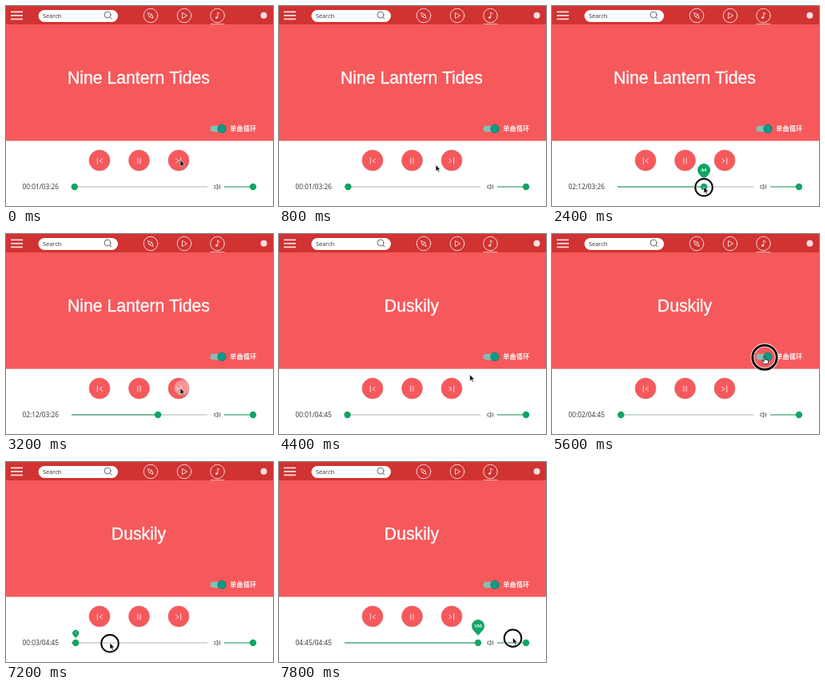
Animation, 334 px wide and 250 px high, one loop 8 s. Source, as an HTML page:

```html
<!DOCTYPE html>
<html lang="zh">
<head>
<meta charset="utf-8">
<title>Music player</title>
<style>
  html, body { margin: 0; width: 100%; height: 100%; overflow: hidden; background: #fff; }
  svg { display: block; width: 100vw; height: 100vh; }
  .line { fill: none; stroke: #fff; stroke-linecap: round; stroke-linejoin: round; }
  .dark { stroke: #555; }
  #title { font: 21.2px "Liberation Sans", Arial, sans-serif; fill: #fff; stroke: #fff; stroke-width: .3; text-anchor: middle; }
  .small { font-family: "Open Sans", sans-serif; fill: #333; }
  #mode { font: bold 8px "Noto Sans CJK SC", "Noto Sans CJK", sans-serif; letter-spacing: .3px; fill: #fff; opacity: .93; }
  #percent { font: bold 5.8px Roboto, sans-serif; fill: #fff; text-anchor: middle; }
</style>
</head>
<body>
<svg viewBox="0 0 334 250" preserveAspectRatio="none">
  <rect width="334" height="168.6" fill="#f6595c"/>
  <rect width="334" height="23" fill="#d13232"/>

  <path d="M6 7.3H21M6 11.8H21M6 16.3H21" fill="none" stroke="#f8dede" stroke-width="1.7"/>
  <rect x="40.5" y="5" width="99.5" height="15" rx="7.5" fill="#fff"/>
  <text x="46" y="15" class="small" font-size="7.4">Search</text>
  <g class="line dark" stroke-width=".9">
    <circle cx="127" cy="11" r="3.9"/><path d="M129.9 13.9L132 16"/>
  </g>

  <g opacity=".86">
    <g class="line" stroke-width=".9">
      <circle cx="181" cy="12" r="8.8"/>
      <circle cx="223" cy="12" r="8.8"/>
      <circle cx="264.5" cy="12" r="8.8"/>
      <path d="M177.8 8.6L182.6 10.5L184.2 15.4L179.4 13.5ZM182.6 10.5L179.4 13.5"/>
      <path d="M220.8 8.6L226.6 12L220.8 15.4Z"/>
      <path d="M264.8 14.3V7.8Q265.4 9.3 267.2 9.7"/>
    </g>
    <ellipse cx="263.5" cy="14.5" rx="1.5" ry="1.3" fill="#fff"/>
    <path d="M255.5 22.5H273.5" stroke="#fff" stroke-width=".7"/>
  </g>
  <circle cx="322.5" cy="11.7" r="4" fill="#f6dede"/>

  <text id="title" x="166" y="97"></text>

  <rect id="track" x="255.5" y="149.8" width="18.5" height="7.4" rx="3.7"/>
  <circle cx="270" cy="154" r="0"/>
  <circle id="knob" cy="153.4" r="5.4" stroke="#000" stroke-opacity=".2" stroke-width=".8"/>
  <text id="mode" x="280.3" y="156.2">单曲循环</text>

  <g fill="#f6595c" stroke="#d9686a" stroke-width=".6">
    <circle cx="117" cy="193" r="13"/>
    <circle cx="166.5" cy="193" r="13"/>
    <circle cx="216" cy="193" r="13"/>
  </g>
  <g class="line" stroke-width=".9" opacity=".92">
    <path d="M114.3 190V197.3M120.3 191.3L117 193.6L120.3 195.9"/>
    <path d="M164.9 190.2V196.8M168.1 190.2V196.8"/>
    <path d="M212.7 191.3L216 193.6L212.7 195.9M218.7 190V197.3"/>
  </g>
  <clipPath id="nextShape"><circle cx="216" cy="193" r="13"/></clipPath>
  <g clip-path="url(#nextShape)"><circle id="ripple" cx="220" cy="192" fill="#fff"/></g>

  <text id="time" x="20.5" y="228.5" class="small" font-size="8.3"></text>
  <path d="M82 226H252" stroke="#c6cfca" stroke-width="1.3"/>
  <path id="played" stroke="#5fb18b" stroke-width="1.3"/>
  <circle id="thumb" cy="226" r="4.2" fill="#0fa566"/>
  <g id="bubble">
    <path d="M0 -6L-6.3 -13A8 8 0 1 1 6.3 -13Z" fill="#0fa566"/>
    <text id="percent" y="-16"></text>
  </g>

  <path d="M261.2 224.5H262.6L264.6 223V229L262.6 227.5H261.2Z" class="line dark" stroke-width=".8"/>
  <path d="M266.2 224.6Q267.3 226 266.2 227.4M267.4 223.3Q269.6 226 267.4 228.7" class="line dark" stroke-width=".7"/>
  <path d="M273 226H309" stroke="#5fb18b" stroke-width="1.3"/>
  <circle cx="309" cy="226" r="4.2" fill="#0fa566"/>

  <g id="ring" fill="none">
    <circle r="11" stroke="#fff" stroke-opacity=".7" stroke-width="3.6"/>
    <circle r="11" stroke="#000" stroke-width="2"/>
  </g>
  <path id="arrow" d="M0 0V8L1.9 6.4L3.2 9.3L4.5 8.7L3.2 5.9H5.6Z" stroke="#fff" stroke-width=".6"/>
  <path id="hand" d="M-.8 0Q0 -1.2 .8 0V3.4L4 4.2Q5 4.6 4.7 6L4 9H-.8L-3.5 5.8Q-3.3 4.5 -2 5.2L-.8 6Z" fill="#fff" stroke="#111" stroke-width=".8"/>
</svg>
<script>
const LOOP = 8000, STEP = 200;

// Each song plays in real time from `start`; a drag moves it to `seekTo` seconds.
const songs = [
  { title: "Nine Lantern Tides", length: 206, start: -1000, grab: 1800, settle: 2400, release: 2400, seekTo: 132 },
  { title: "Duskily", length: 285, start: 3400, grab: 7200, settle: 7600, release: LOOP, seekTo: 285 }
];

const nextButton = { x: 218, y: 192.5 };
const toggle = { x: 266, y: 153.5 };
const moves = [
  { from: 400, until: 1800, to: { x: 108, y: 223 } },
  { from: 1800, until: 2400, to: { x: 190, y: 226 } },
  { from: 2400, until: 3100, to: nextButton },
  { from: 3900, until: 5000, to: toggle },
  { from: 5700, until: 7000, to: { x: 130, y: 226 } },
  { from: 7200, until: 7800, to: { x: 292.5, y: 219.5 } }
];

const $ = id => document.getElementById(id);
const set = (id, attrs) => {
  for (const name in attrs) $(id).setAttribute(name, attrs[name]);
};
const show = (id, visible) => set(id, { visibility: visible ? "visible" : "hidden" });
const within = (t, from, to) => t >= from && t <= to;
const ramp = (t, from, to) => Math.min(1, Math.max(0, (t - from) / (to - from)));
const smooth = u => u * u * (3 - 2 * u);
const mix = (a, b, u) => a + (b - a) * u;

function clock(seconds) {
  const pad = n => String(Math.floor(n)).padStart(2, "0");
  return pad(seconds / 60) + ":" + pad(seconds % 60);
}

function drawPlayer(t, song) {
  const seconds = mix((t - song.start) / 1000, song.seekTo, ramp(t, song.grab, song.settle));
  const progress = seconds / song.length;
  const x = mix(85, 249, progress);
  const size = ramp(t, song.grab - 200, song.grab + 200) - ramp(t, song.release, song.release + 300);

  $("title").textContent = song.title;
  $("time").textContent = clock(seconds) + "/" + clock(song.length);
  $("percent").textContent = Math.round(progress * 100);
  set("played", { d: `M82 226H${x}` });
  set("thumb", { cx: x });
  set("bubble", { transform: `translate(${x} 223) scale(${size})` });
  show("bubble", size > 0);
}

function drawSwitch(t) {
  const on = 1 - ramp(t, 5000, 5150) + ramp(t, 5400, 5600);
  set("knob", { cx: mix(260, 270, on), fill: on > 0.5 ? "#0b9a88" : "#fafafa" });
  set("track", { fill: on > 0.5 ? "#83bfb2" : "#a8484a" });
}

function drawPointer(t, song) {
  let { x, y } = nextButton;
  for (const { from, until, to } of moves) {
    const u = smooth(ramp(t, from, until));
    x = mix(x, to.x, u);
    y = mix(y, to.y, u);
  }
  const onSwitch = within(t, 4900, 5700);
  const pressed = within(t, song.grab, song.release) || t === 5000;
  const released = t === 5600;

  set("arrow", { transform: `translate(${x} ${y})` });
  set("hand", { transform: `translate(${x} ${y})` });
  set("ring", { transform: `translate(${x} ${y + 0.7}) scale(${released ? 1.38 : 0.98})` });
  show("arrow", !onSwitch);
  show("hand", onSwitch);
  show("ring", pressed || released);

  const spread = ramp(t, 3200, 3400);
  set("ripple", { r: mix(9.5, 17, spread), opacity: mix(0.36, 0.18, spread) });
  show("ripple", within(t, 3200, 3400));
}

function frame(now) {
  const t = Math.floor((now % LOOP) / STEP) * STEP;
  const song = songs[t < songs[1].start ? 0 : 1];
  drawPlayer(t, song);
  drawSwitch(t);
  drawPointer(t, song);
  requestAnimationFrame(frame);
}
frame(performance.now());
</script>
</body>
</html>
```
